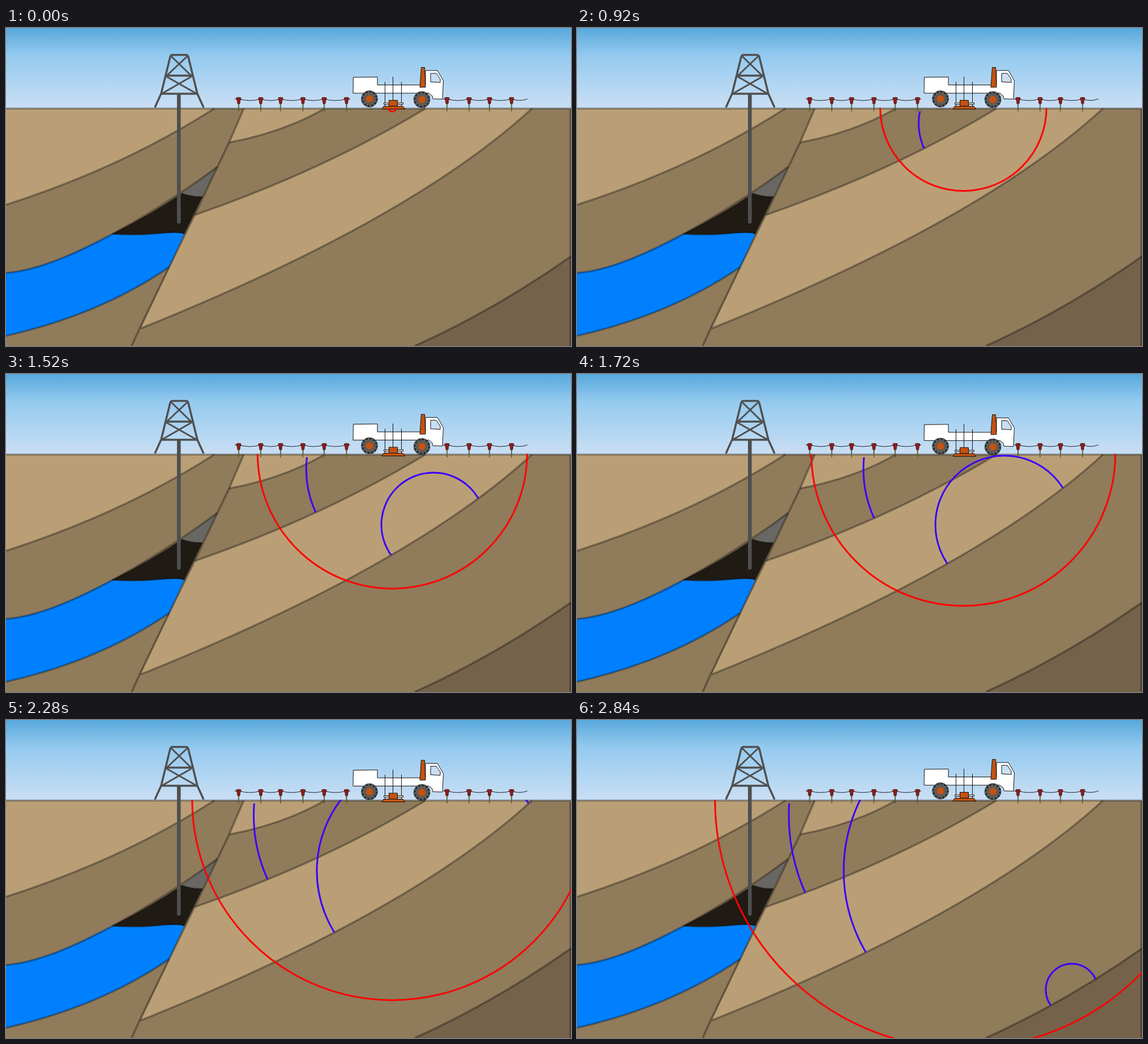
These frames come from a looping animation (998 px wide and 561 px high, 2880 ms). An HTML page:

```html
<!DOCTYPE html>
<html lang="en">
<head>
<meta charset="utf-8">
<title>Seismic survey</title>
<style>
html, body { margin: 0; width: 100%; height: 100%; overflow: hidden; }
svg { display: block; width: 100vw; height: 100vh; }
</style>
</head>
<body>
<svg viewBox="0 0 998 561" preserveAspectRatio="none">
  <defs>
    <linearGradient id="sky" x1="0" y1="0" x2="0" y2="1">
      <stop offset="0" stop-color="#58a8dc"/>
      <stop offset=".34" stop-color="#94caef"/>
      <stop offset="1" stop-color="#cbdff4"/>
    </linearGradient>
    <clipPath id="ground"><path d="M0 141H998V561H0Z"/></clipPath>
    <clipPath id="above1"><path d="M741 142Q563 250 333 330V147H741Z"/></clipPath>
    <clipPath id="above2"><path d="M929 142Q716 338 238 530V141H929Z"/></clipPath>
    <clipPath id="above3"><path d="M998 403Q864 497 722 561V141H998Z"/></clipPath>
    <g id="wheel">
      <circle r="14.4" fill="#5c5c5c" stroke="#333" stroke-width=".8"/>
      <circle r="12.6" fill="none" stroke="#262626" stroke-width="3" stroke-dasharray="3 3.6"/>
      <circle r="6.9" fill="#c5520f" stroke="#555" stroke-width="1"/>
    </g>
    <g id="phone">
      <path d="M-.8 132H.8L.4 147H-.4Z" fill="#5c6130" stroke="#55592c" stroke-width=".6"/>
      <path d="M-4 123Q0 121.500 4 123V126.500H3L2 133.500H-2L-3 126.500H-4Z" fill="#8c1d1d" stroke="#3c0c0c" stroke-width=".7"/>
    </g>
  </defs>

  <rect width="998" height="143" fill="url(#sky)"/>

  <rect y="142" width="998" height="419" fill="#907b5b"/>
  <path fill="#ba9f76" d="M0 142H368Q205 246 0 312Z"/>
  <path fill="#ba9f76" d="M420 142H563Q490 184 394 202Z"/>
  <path fill="#ba9f76" d="M741 142H929Q716 338 238 530L333 330Q563 250 741 142Z"/>
  <path fill="#74634a" d="M998 403Q864 497 722 561H998Z"/>
  <path fill="#0080ff" d="M0 432C72 424 132 391 188 363Q230 366 270 362T315 363L288 422Q165 506 0 543Z"/>
  <path fill="#1f1a14" d="M188 363Q254 330 310 292Q328 299 347 298L315 363Q303 359 270 362T188 363Z"/>
  <path fill="#696763" d="M310 292L373 245L347 298Q325 298 310 292Z"/>

  <g fill="none" stroke="#000" stroke-opacity=".32" stroke-width="3.600">
    <path d="M0 142H998M997 142V561"/>
    <path d="M368 142Q205 246 0 312"/>
    <path d="M373 245C290 308 105 426 0 432"/>
    <path d="M288 422Q165 506 0 543"/>
    <path d="M420 142L394 202L333 330L288 422L236 530L222 561"/>
    <path d="M563 142Q490 184 394 202"/>
    <path d="M741 142Q563 250 333 330"/>
    <path d="M929 142Q716 338 238 530"/>
    <path d="M998 403Q864 497 722 561"/>
  </g>
  <g fill="none" stroke="#14110d" stroke-opacity=".7" stroke-width="2.600">
    <path d="M188 363Q230 366 270 362T315 363M310 292Q328 299 347 298"/>
  </g>

  <g fill="none" stroke="#4f4f4f" stroke-linecap="round" stroke-linejoin="round">
    <path stroke-width="3.500" d="M263.500 139L274 116L290 51Q291 47.500 294 47.500H318Q321 47.500 322 51L338 116L348.500 139M283 84H328M274 116H338"/>
    <path stroke-width="3" d="M292 50L327 84M320 50L284 84M284 86L337 116M327 86L275 116"/>
    <path stroke-width="6.600" stroke-linecap="butt" d="M305.300 116V330"/>
    <path stroke-width="6.600" d="M305.300 320V342"/>
  </g>

  <g id="spread"></g>

  <g id="truck" stroke="#111" stroke-width="1">
    <path fill="#fff" d="M613.500 87L656 86.500V100.500H741V75H762L772.500 93L771 125.500L754 125L753 120L747 115H613Z"/>
    <path fill="#c9def3" d="M750 80H760L767 90V96L750 95Z"/>
    <path fill="#c5520f" d="M733.500 69.500H739.500L741 104.500H731Z"/>
    <use href="#wheel" x="642" y="125"/>
    <use href="#wheel" x="734.600" y="126.300"/>
    <path fill="none" d="M669.500 95V138M683.500 86V128M698.500 95V138"/>
    <path fill="#fff" d="M667.500 132H701.500V134.500H667.500Z"/>
    <path fill="#c5520f" d="M676.500 127.500H691.500V138H676.500Z"/>
    <path fill="#c5520f" d="M667 138H701L705 143H664Z"/>
  </g>

  <g fill="none" stroke-width="3">
    <g clip-path="url(#ground)"><circle id="down" cx="682.400" cy="140.600" stroke="#f00"/></g>
    <g id="echoes" stroke="#3b00ff"></g>
  </g>
</svg>
<script>
const LOOP = 2880, STEP = 40, LAST = 2800;
const NS = "http://www.w3.org/2000/svg";
const byId = id => document.getElementById(id);

function add(parent, tag, attrs) {
  const el = document.createElementNS(NS, tag);
  for (const key in attrs) el.setAttribute(key, attrs[key]);
  return parent.appendChild(el);
}

// Geophones joined by a slack cable
function layCable(start, xs, end) {
  const stops = [start, ...xs, end];
  let d = `M${start} 125`;
  for (let i = 1; i < stops.length; i++) {
    const gap = stops[i] - stops[i - 1];
    d += `q${gap / 2} ${Math.min(6, gap / 5)} ${gap} 0`;
  }
  add(byId("spread"), "path", { d, fill: "none", stroke: "#1c2430", "stroke-width": 1 });
  for (const x of xs) add(byId("spread"), "use", { href: "#phone", x });
}
layCable(404, [411, 450, 485, 524.5, 562, 601.5], 608);
layCable(772, [779, 818, 854, 893], 921);

// Reflections: centre, birth time, radius at birth, speed in px/ms
const echoes = [
  { cx: 711, cy: 168, born: 200, r: 19.7, speed: 0.122 },
  { cx: 755, cy: 266, born: 921, r: 2.1, speed: 0.15 },
  { cx: 874, cy: 476, born: 2500, r: 1, speed: 0.15 }
];
echoes.forEach((e, i) => {
  const g = add(byId("echoes"), "g", { "clip-path": `url(#above${i + 1})` });
  e.el = add(g, "circle", { cx: e.cx, cy: e.cy });
});

// Vertical shake of the truck, one key every two steps
const shake = [0, 1.6, 3.2, 1.6, 3.1, 0];
function shakeAt(t) {
  const k = t / (2 * STEP), i = Math.floor(k), n = shake.length;
  const a = shake[i % n], b = shake[(i + 1) % n];
  return a + (b - a) * (k - i);
}

function draw(t) {
  const held = Math.min(t, LAST);
  byId("down").setAttribute("r", 7 + 0.152 * t);
  byId("truck").setAttribute("transform", `translate(0 ${shakeAt(held)})`);
  for (const e of echoes) {
    const age = held - e.born;
    e.el.setAttribute("visibility", age >= 0 ? "visible" : "hidden");
    e.el.setAttribute("r", Math.max(0, e.r + e.speed * age));
  }
}

const begin = performance.now();
function tick() {
  const t = (performance.now() - begin) % LOOP;
  draw(Math.floor(t / STEP) * STEP);
  requestAnimationFrame(tick);
}
draw(0);
requestAnimationFrame(tick);
</script>
</body>
</html>
```
